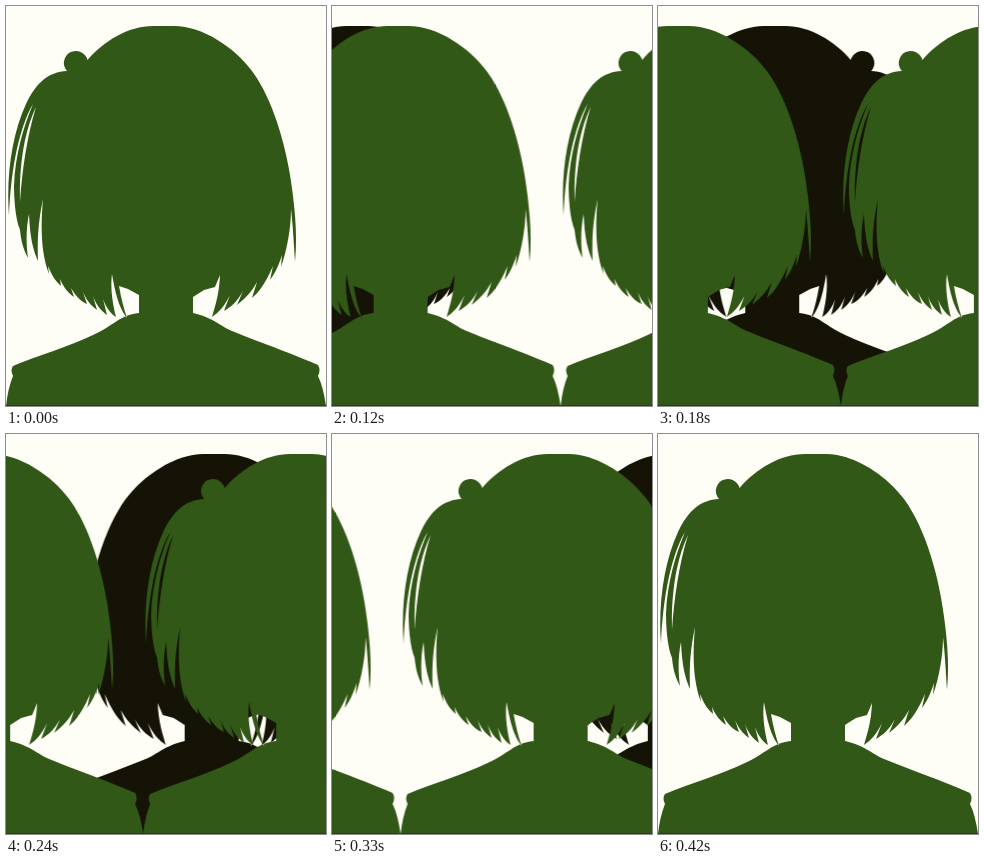
An HTML page for the animation above (450 ms loop, 320 px wide and 400 px high).

```html
<!DOCTYPE html>
<html lang="en">
<head>
<meta charset="utf-8">
<title>Passing silhouettes</title>
<style>
  html, body { margin: 0; width: 100%; height: 100%; overflow: hidden; background: #fffef6; }
  svg { display: block; width: 320px; height: 400px; }
  .front { fill: #325818; animation: front .45s steps(15, jump-none) infinite; }
  .back { fill: #151305; animation: back .45s steps(15, jump-none) infinite; }
  @keyframes front { from { transform: translateX(0); } to { transform: translateX(-320px); } }
  @keyframes back { from { transform: translateX(-320px); } to { transform: translateX(320px); } }
</style>
</head>
<body>
<svg viewBox="0 0 320 400">
  <defs>
    <path id="figure" fill-rule="evenodd" d="
      M61 65 A12 12 0 1 1 81.5 54
      C98 35 122 20 147 20 L168 20
      C197 20 229 42 246 65 C268 95 282 145 287 190
      C290 215 291 235 289 256 C288 240 287 220 285 203
      C285 222 281 244 275 261 L276 249
      C272 262 268 268 264 274 L267 260
      C260 276 254 285 246 292 L251 276
      C246 285 240 292 231 299 L237 285
      C231 296 226 300 218 305 L224 289
      C218 301 213 306 206 311
      C209 300 213 290 214 269 L209 281 L198 284 L187 291 V307
      C208 312 214 320 226 325 C250 335 285 347 312 359
      Q315 364 312 370 Q317 380 320 400
      H0 Q2 382 7 370 Q4 364 7 360
      C30 350 65 340 87 329 C108 320 113 309 133 307
      V289 L122 283 L113 280
      C115 292 118 303 121 312 C114 303 110 292 106 268
      C104 283 107 299 110 311 C104 307 100 301 97 293
      L101 309 C94 304 90 298 87 290
      L91 304 C84 299 80 293 77 286
      L81 298 C74 295 69 289 65 282
      L68 291 C61 286 57 280 54 273
      L55 280 C48 274 45 267 42 260
      L43 268 C34 245 35 215 37 193
      C33 212 31 230 32 255 C27 244 24 232 23 208
      C20 222 20 238 22 252 C17 243 15 234 14 224
      C9 212 8 190 8 180 C9 150 17 122 27 98
      C14 120 5 160 3 210
      C0 170 6 128 20 98 C30 77 42 66 61 65 Z
      M30 101 C21 120 13 150 14 196 C16 165 21 130 30 101 Z"/>
  </defs>
  <g class="back">
    <use href="#figure" transform="translate(320) scale(-1 1)"/>
  </g>
  <g class="front">
    <use href="#figure"/>
    <use href="#figure" x="320"/>
  </g>
  <rect y="399" width="320" height="1" fill="#151305" opacity=".35"/>
</svg>
</body>
</html>
```
